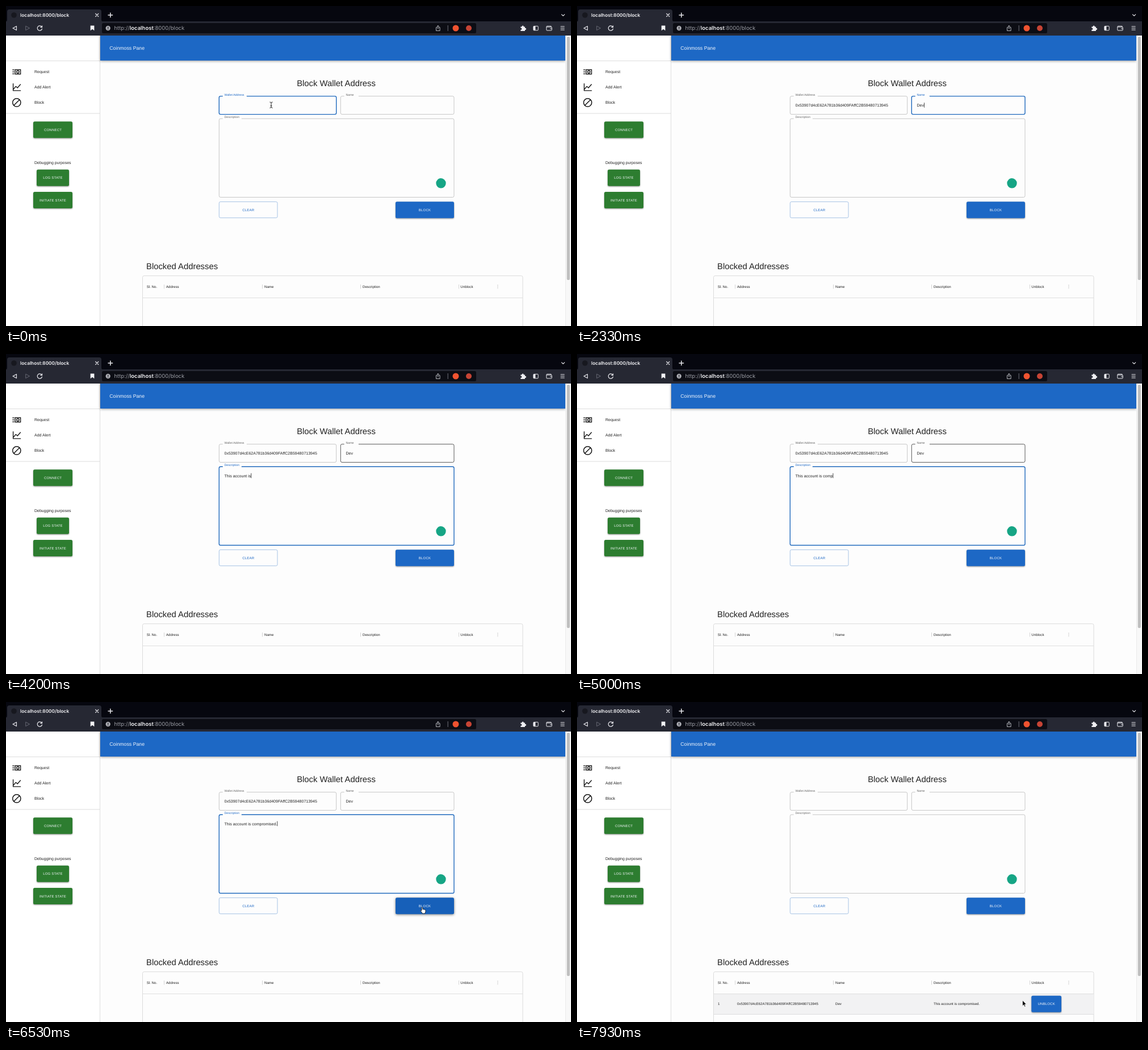
These frames come from a looping animation (995x563 px, 8000 ms). An HTML page:

```html
<!DOCTYPE html>
<html lang="en">
<head>
<meta charset="utf-8">
<title>Block Wallet Address</title>
<style>
html, body { margin: 0; width: 100%; height: 100%; overflow: hidden; background: #fdfdfd; }
svg { display: block; width: 100%; height: 100%; }
text { font-family: "Liberation Sans", Arial, sans-serif; fill: #222; white-space: pre; text-rendering: geometricPrecision; }
.ui { font-family: Inter, "Open Sans", sans-serif; }
.line { fill: none; stroke-linecap: round; stroke-linejoin: round; }
.raised { filter: drop-shadow(0 1px 1px rgba(0,0,0,.42)); }
</style>
</head>
<body>
<svg id="stage" viewBox="0 0 995 563" preserveAspectRatio="none"></svg>
<script>
const LOOP = 8000;
const ADDRESS = "0x53907d4cE62A781b36d409FAffC2B59480713945";
const NAME = "Dev";
const NOTE = "This account is compromised.";
const BLUE = "#1d68c5", GREEN = "#2d7d30";

// Markup helpers
const rect = (x, y, w, h, fill, more = "") =>
  `<rect x="${x}" y="${y}" width="${w}" height="${h}" fill="${fill}" ${more}/>`;
const text = (x, y, size, str, more = "") =>
  `<text x="${x}" y="${y}" font-size="${size}" ${more}>${str}</text>`;
const line = (d, color, width = 1, more = "") =>
  `<path class="line" d="${d}" stroke="${color}" stroke-width="${width}" ${more}/>`;
const dot = (x, y, r, fill, more = "") =>
  `<circle cx="${x}" cy="${y}" r="${r}" fill="${fill}" ${more}/>`;
const caption = (x, y, str, color) =>
  text(x, y, 6.05, str, `text-anchor="middle" letter-spacing=".17" style="fill:${color}"`);
const button = (x, y, w, h, fill, str) =>
  rect(x, y, w, h, fill, 'rx="2.5" class="raised"') + caption(x + w / 2, y + h / 2 + 2, str, "#f4f6fa");

const fields = {
  wallet: { x: 375.3, y: 158.6, w: 206.4, h: 32, notch: 43, label: "Wallet Address" },
  name: { x: 589.3, y: 158.6, w: 199.7, h: 32, notch: 26, label: "Name" },
  note: { x: 375.3, y: 198.2, w: 413.7, h: 138.3, notch: 34, label: "Description" }
};

// Rounded outline with a gap at the top for the label
function outline({ x, y, w, h, notch }) {
  const r = 2.6, a = x + 6;
  return `M${a} ${y}H${x + r}q${-r} 0 ${-r} ${r}V${y + h - r}q0 ${r} ${r} ${r}H${x + w - r}` +
    `q${r} 0 ${r} ${-r}V${y + r}q0 ${-r} ${-r} ${-r}H${a + notch}`;
}

function field(id) {
  const f = fields[id], tx = f.x + 9.2;
  return line(outline(f), "#bbb", .8, `id="${id}-box"`) +
    text(tx, f.y - 1, 5.28, f.label, `id="${id}-label"`) +
    text(tx, f.y + 18.3, 7.03, "", `id="${id}-text"`);
}

function browser() {
  const light = "#e9e9ee";
  return rect(0, 0, 995, 52, "#06070f") +
    rect(0, 27, 995, 25, "#262833") +
    '<path d="M0 28Q2 27 2 24V10Q2 6 6 6H164Q168 6 168 10V24Q168 27 171 28Z" fill="#262833"/>' +
    dot(14, 16, 4.8, "#17181f") +
    text(25, 19, 8.3, "localhost:8000/block", 'class="ui" font-weight="600" style="fill:#f1f1f4"') +
    line("M157.7 13.5l5 5m0-5l-5 5", light, 1.2) +
    line("M180 16h7.6m-3.8-3.8v7.6", light, 1.5) +
    line("M978.5 14.8l2.6 2.6 2.6-2.6", light, 1.2) +
    line("M18.5 35.6v7L12 39.1z", light, 1.1) +
    line("M34.7 35.6v7l6.4-3.5z", "#666873", 1) +
    line("M63 36.8a4.2 4.2 0 1 0 .5 3.2M63.5 34.8v2.6h-2.8", light, 1.2) +
    '<path d="M148.7 34.5h6.7v8.7l-3.35-2.5-3.35 2.5z" fill="#f4f4f7"/>' +
    rect(169, 30, 659, 18, "#0c0d14", 'rx="2.5"') +
    dot(179.7, 39, 4.2, "#a9aab0") + rect(179.1, 36.6, 1.2, 3, "#16171e") + rect(179.1, 40.3, 1.2, 1.2, "#16171e") +
    text(190.5, 42.2, 9.5, 'http://<tspan font-weight="600" style="fill:#f2f2f5">localhost</tspan>:8000/block',
      'class="ui" style="fill:#9d9fa7"') +
    line("M759.2 37.7h-1.7v5.8h6.6v-5.8h-1.7M760.8 40.5v-6m-1.9 1.8l1.9-1.9 1.9 1.9", "#c8c9cf", .9) +
    rect(777.7, 34, 1, 10, "#70727b") +
    dot(792, 39, 5.5, "#ef5330") + dot(815, 39, 5, "#c64435") +
    '<path d="M906.3 36.6h2.3a1.6 1.6 0 1 1 3 0h2.3v2.3a1.6 1.6 0 1 1 0 3v2h-7.6v-2.3a1.5 1.5 0 1 0 0-2.8z" fill="#f0f0f3"/>' +
    rect(928.8, 35.4, 8.4, 7.4, "none", `rx="1" stroke="${light}"`) + rect(929, 35.5, 3.4, 7.2, light) +
    line("M960 37v-1.6h-7.2a1 1 0 0 0-1 1V42q0 1 1 1h7.4q1 0 1-1v-4q0-1-1-1h-8M958.5 39.9h2.4", light, 1) +
    line("M977 36h6.2M977 39h6.2M977 42h6.2", light, 1.1);
}

function sidebar() {
  const ink = "#161616";
  const item = (y, str) => text(50, y, 7, str);
  return rect(0, 52, 165, 511, "#fff") + rect(165, 52, 1, 511, "#dedede") +
    rect(0, 96, 165, 1, "#dedede") + rect(0, 188.5, 165, 1, "#dedede") +
    line("M11.7 112.4h2.6M11.7 115.9h2.6M11.7 119.4h2.6", ink, 1.3) +
    rect(16.2, 112, 9.4, 7.8, "#fff", `stroke="${ink}" stroke-width="1.4"`) +
    dot(20.9, 115.9, 2.1, "#fff", `stroke="${ink}" stroke-width="1.4"`) +
    line("M12.6 136.7v12.2h13M13.4 146l4-4.6 2.8 2.6 5.2-6", ink, 1.4) +
    dot(18.8, 169.9, 7.1, "none", `stroke="${ink}" stroke-width="1.5"`) +
    line("M13.9 174.8l9.8-9.8", ink, 1.5) +
    item(118, "Request") + item(145, "Add Alert") + item(172, "Block") +
    button(48, 203.3, 69, 29, GREEN, "CONNECT") +
    item(277.7, "Debugging purposes") +
    button(54, 287.8, 57, 29, GREEN, "LOG STATE") +
    button(48, 327, 69, 29, GREEN, "INITIATE STATE");
}

function table() {
  const cell = (x, y, str) => text(x, y, 6.15, str);
  const heads = [[247.7, "Sl. No."], [282, "Address"], [455, "Name"], [628, "Description"], [800.3, "Unblock"]];
  const bars = [278, 451, 624, 797, 865.5];
  return text(247, 462.7, 14.83, "Blocked Addresses") +
    rect(240.5, 474.7, 669.5, 120, "none", 'rx="2.6" stroke="#dcdcdc"') +
    '<g id="row">' + rect(241, 513.5, 668.6, 36, "#f2f2f3", 'id="row-bg"') +
    cell(248, 533, "1") + cell(282, 533, ADDRESS) + cell(455, 533, NAME) + cell(628, 533, NOTE) +
    button(800.3, 516.7, 52.7, 29, BLUE, "UNBLOCK") + rect(241, 549, 669, .9, "#dcdcdc") + "</g>" +
    heads.map(([x, s]) => cell(x, 496, s)).join("") +
    bars.map(x => rect(x, 490, .9, 7.5, "#d2d2d2")).join("") +
    rect(241, 513, 669, .9, "#dcdcdc");
}

const pointers =
  '<g id="pointer">' +
  '<g id="beam">' +
  line("M-2.2 -5q1.8 0 2.2 1.3q.4-1.3 2.2-1.3M0 -3.7V4M-2.2 5.3q1.8 0 2.2-1.3q.4 1.3 2.2 1.3M-1 1.6h2", "#fff", 2.2) +
  line("M-2.2 -5q1.8 0 2.2 1.3q.4-1.3 2.2-1.3M0 -3.7V4M-2.2 5.3q1.8 0 2.2-1.3q.4 1.3 2.2 1.3M-1 1.6h2", "#111", .9) + "</g>" +
  '<path id="arrow" d="M0 0V9.7L2.2 7.7L3.8 11.3L5.4 10.6L3.8 7.1H6.8Z" fill="#000" stroke="#fff" stroke-width=".7"/>' +
  '<path id="hand" d="M-1 0.6q1-1.4 1.9 0v3.2q1.2-.6 1.8.3q1.2-.5 1.6.4q1.5-.3 1.6 1v2.2q-.2 1.4-1 2.6v.8H.3q-.6-1.5-2.2-3.4q-1.5-1.7-.8-2.3q.8-.4 1.7.8z" fill="#fff" stroke="#111" stroke-width=".8"/>' +
  "</g>";

const svg = document.getElementById("stage");
svg.innerHTML =
  '<defs><clipPath id="clip">' + rect(686, 344.3, 103, 29, "#000", 'rx="2.5"') + "</clipPath></defs>" +
  rect(0, 0, 995, 563, "#fdfdfd") + sidebar() +
  rect(166, 50, 819, 46, BLUE, 'style="filter:drop-shadow(0 1.5px 2px rgba(0,0,0,.4))"') +
  text(182.3, 76.7, 8.75, "Coinmoss Pane", 'style="fill:#f2f6fc"') +
  rect(985, 52, 10, 511, "#f8f8f8") + rect(985, 52, .8, 511, "#e6e6e6") +
  rect(987.7, 54, 5.2, 428, "#bfbfbf", 'rx="2.6"') +
  browser() +
  text(512.2, 140.5, 14.83, "Block Wallet Address") +
  Object.keys(fields).map(field).join("") +
  line("M384.5 178.4H548", "#d8453c", 1, 'id="spelling" stroke-dasharray="0.6 1.6"') +
  rect(0, 0, .8, 8.6, "#222", 'id="caret"') +
  dot(766, 311.8, 8.7, "#16a585") +
  rect(375.3, 344.4, 102.7, 28.3, "none", 'rx="2.5" stroke="#9dbde3" stroke-width=".9"') +
  caption(426.7, 360.5, "CLEAR", BLUE) +
  rect(686, 344.3, 103, 29, BLUE, 'id="block" rx="2.5" class="raised"') +
  '<g clip-path="url(#clip)">' + dot(733, 362, 0, "#fff", 'id="ripple"') + "</g>" +
  caption(737.5, 360.5, "BLOCK", "#f4f6fa") +
  table() + pointers;

const el = id => document.getElementById(id);
const show = (id, on) => el(id).setAttribute("visibility", on ? "inherit" : "hidden");
const set = (id, attrs) => { for (const k in attrs) el(id).setAttribute(k, attrs[k]); };
const clamp = v => Math.max(0, Math.min(1, v));
const smooth = v => v * v * (3 - 2 * v);
const inside = (p, f) => p[0] >= f.x && p[0] <= f.x + f.w && p[1] >= f.y && p[1] <= f.y + f.h;

// Value of a keyed track [time, ...values] at time t
function track(keys, t, ease = v => v) {
  const i = keys.findIndex(k => k[0] > t);
  if (i === 0) return keys[0].slice(1);
  if (i < 0) return keys[keys.length - 1].slice(1);
  const a = keys[i - 1], b = keys[i], p = ease((t - a[0]) / (b[0] - a[0]));
  return a.slice(1).map((v, n) => v + (b[n + 1] - v) * p);
}

const PATH = [[600, 467, 174], [850, 625, 176.5], [6050, 625, 176.5], [6270, 812, 305],
  [6450, 733, 361], [7050, 733, 361], [7450, 784.6, 525]];
const NAME_KEYS = [1880, 2040, 2190];
const NOTE_KEYS = [[2660, 0], [2730, 1], [2860, 2], [3070, 3], [4180, 15], [4690, 17], [4800, 18], [5670, 27], [5940, 28]];
const PASTE = 270, PRESS = 6650, DONE = 6860;
const blockArea = { x: 686, y: 344, w: 103, h: 29 };
const rowArea = { x: 241, y: 513.5, w: 669, h: 36 };

function draw(t) {
  const done = t >= DONE;
  const pos = track(PATH, t, smooth);
  const focus = t < 970 ? "wallet" : t < 2550 ? "name" : t < PRESS ? "note" : "";
  const values = {
    wallet: t >= PASTE && !done ? ADDRESS : "",
    name: done ? "" : NAME.slice(0, NAME_KEYS.filter(k => t >= k).length),
    note: done ? "" : NOTE.slice(0, Math.floor(track(NOTE_KEYS, t)[0] + 1e-6))
  };

  for (const id in fields) {
    const active = id === focus, over = inside(pos, fields[id]);
    set(id + "-box", {
      stroke: active ? "#1f69bd" : over ? "#303030" : "#b9b9b9",
      "stroke-width": active ? 1.4 : .8
    });
    el(id + "-label").style.fill = active ? BLUE : "#666";
    el(id + "-text").textContent = values[id];
  }
  show("spelling", focus === "wallet" && t >= PASTE);

  const caretOn = (t >= PASTE && t < 770) || (t >= 970 && t < 1470) || (t >= 1880 && t < PRESS);
  show("caret", caretOn && focus);
  if (caretOn && focus) {
    const f = fields[focus];
    set("caret", { x: f.x + 9.3 + el(focus + "-text").getComputedTextLength(), y: f.y + 11.5 });
  }

  const onBlock = inside(pos, blockArea);
  set("block", { fill: onBlock ? "#1760b9" : BLUE });
  el("block").style.filter = onBlock ? "drop-shadow(0 1.5px 2px rgba(0,0,0,.5))" : "";
  set("ripple", {
    r: 58 * smooth(clamp((t - PRESS) / 420)),
    opacity: t < PRESS ? 0 : .2 * (1 - clamp((t - 6940) / 400))
  });

  const onRow = done && inside(pos, rowArea);
  show("row", done);
  show("row-bg", onRow);

  const beam = Object.values(fields).some(f => inside(pos, f));
  set("pointer", { transform: `translate(${pos})` });
  show("pointer", t < 1880 || t >= 6050);
  show("beam", beam);
  show("hand", onBlock);
  show("arrow", !beam && !onBlock);
}

function tick() {
  draw(performance.now() % LOOP);
  requestAnimationFrame(tick);
}
tick();
</script>
</body>
</html>
```
